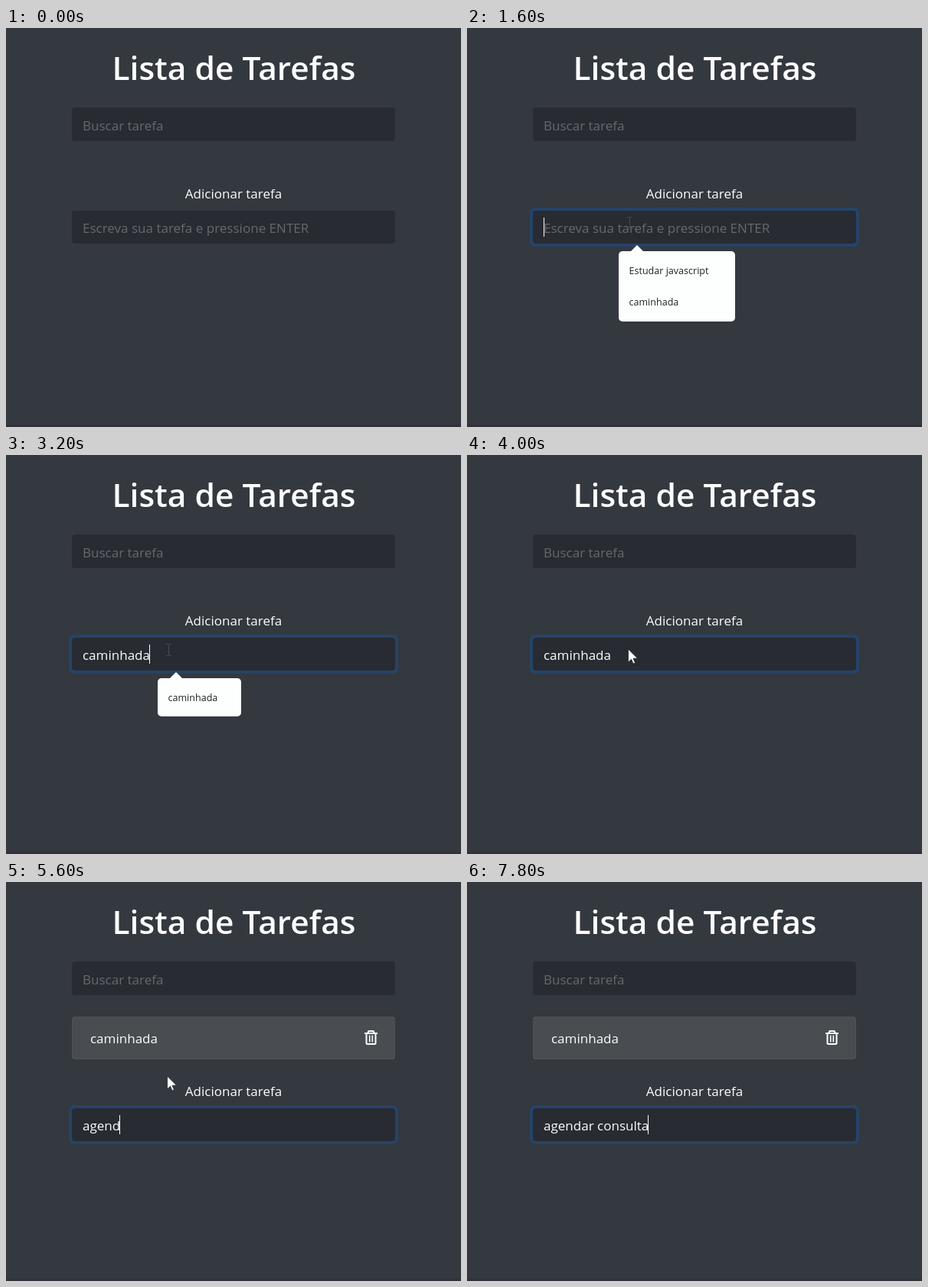
An HTML page with a canvas that plays this animation: 594x522 px, repeating every 8 s.

```html
<!DOCTYPE html>
<html lang="pt-BR">
<head>
<meta charset="utf-8">
<title>Lista de Tarefas</title>
<style>
  html, body { margin: 0; width: 100%; height: 100%; overflow: hidden; background: #34383f; }
  canvas { display: block; width: 594px; height: 522px; }
</style>
</head>
<body>
<canvas id="stage" width="594" height="522"></canvas>
<script>
const ctx = document.getElementById("stage").getContext("2d");
const LOOP = 8000, STEP = 200;
const FAMILY = '"Open Sans", "Noto Sans", sans-serif';
const BODY = "17.05px " + FAMILY;
const SMALL = "12.56px " + FAMILY;
const HEADING = "600 42.5px " + FAMILY;
const LEFT = 86, WIDTH = 422, ITEM_SHIFT = 57;

const COLORS = {
  page: "#34383f", edge: "#352f3b", field: "#282b32", ring: "#254468",
  item: "#494c50", hint: "#67696e", text: "#fcfdfd", ink: "#202224", beam: "#484b51"
};

function box(x, y, w, h, r, color) {
  ctx.fillStyle = color;
  ctx.beginPath();
  ctx.roundRect(x, y, w, h, r);
  ctx.fill();
}

function polygon(points, color) {
  ctx.fillStyle = color;
  ctx.beginPath();
  points.forEach(([x, y]) => ctx.lineTo(x, y));
  ctx.closePath();
  ctx.fill();
}

function label(text, x, y, font, color, align = "left") {
  ctx.font = font;
  ctx.fillStyle = color;
  ctx.textAlign = align;
  ctx.fillText(text, x, y);
}

// Text in the input box, one or more keys per screen update
function typedText(t) {
  const n = start => Math.floor((t - start) / STEP);
  if (t < 2400) return "";
  if (t < 4200) return "caminhada".slice(0, [1, 2, 4, 7][n(2400)] ?? 9);
  if (t < 5000) return "";
  const keys = n(5000) + (t >= 5600 ? 2 : 1);
  return "agendar consulta".slice(0, keys);
}

function caretVisible(t) {
  if (t < 1600) return false;
  if (t < 2400) return t < 2200;
  if (t < 4200) return t < 3600;
  return t >= 4600;
}

function inputField(t, shift) {
  const y = 239 + shift;
  const text = typedText(t);
  if (t >= 1600) box(LEFT - 4, y - 4, WIDTH + 8, 51, 7, COLORS.ring);
  box(LEFT, y, WIDTH, 43, 4, COLORS.field);
  if (text) label(text, 100, y + 29, BODY, COLORS.text);
  else label("Escreva sua tarefa e pressione ENTER", 100, y + 29, BODY, COLORS.hint);
  if (caretVisible(t)) {
    ctx.font = BODY;
    const x = Math.floor(100 + ctx.measureText(text).width - (text ? 0.6 : 0));
    box(x, y + 9, 1, 25, 0, COLORS.text);
  }
}

function suggestions(t) {
  if (t < 1600 || t >= 3600) return;
  const both = t < 2600;
  const rows = both ? ["Estudar javascript", "caminhada"] : ["caminhada"];
  polygon([[213, 293], [222, 284], [231, 293]], "#fdfefe");
  box(198, 292, both ? 152 : 109, both ? 92 : 50, 5, "#fdfefe");
  rows.forEach((row, i) => label(row, 211.5, 322 + 41 * i, SMALL, COLORS.ink));
}

function trash() {
  ctx.strokeStyle = COLORS.text;
  ctx.lineWidth = 2;
  ctx.lineJoin = "round";
  ctx.beginPath();
  ctx.moveTo(468, 198);
  ctx.lineTo(485, 198);
  ctx.moveTo(472, 198);
  ctx.lineTo(473.5, 195);
  ctx.lineTo(479.5, 195);
  ctx.lineTo(481, 198);
  ctx.moveTo(470.5, 198);
  ctx.lineTo(470.5, 210.5);
  ctx.quadraticCurveTo(470.5, 212, 472, 212);
  ctx.lineTo(481, 212);
  ctx.quadraticCurveTo(482.5, 212, 482.5, 210.5);
  ctx.lineTo(482.5, 198);
  ctx.stroke();
  ctx.lineWidth = 1.6;
  ctx.beginPath();
  for (const x of [474.7, 478.3]) {
    ctx.moveTo(x, 200.5);
    ctx.lineTo(x, 209.5);
  }
  ctx.stroke();
}

function taskItem() {
  box(LEFT, 176, WIDTH, 56, 4, "#505357");
  box(LEFT + 1, 177, WIDTH - 2, 54, 3, COLORS.item);
  label("caminhada", 110, 211, BODY, COLORS.text);
  trash();
}

function pointer(t) {
  if (t >= 1000 && t < 4000) {
    box(212, 248, 1, 14, 0, COLORS.beam);
    for (const y of [247, 262]) {
      box(209, y, 3, 1, 0, COLORS.beam);
      box(213, y, 3, 1, 0, COLORS.beam);
    }
  } else if (t >= 4000 && t < 6200) {
    const shape = [[0, 0], [0, 17], [4, 13.2], [6.5, 19], [9, 18], [6.5, 12.2], [12, 12]];
    const points = shape.map(([x, y]) => [210.5 + x, 254 + y]);
    polygon(points, COLORS.text);
    ctx.strokeStyle = "#24272c";
    ctx.lineWidth = 0.8;
    ctx.stroke();
  }
}

function draw(t) {
  const added = t >= 4200;
  const shift = added ? ITEM_SHIFT : 0;
  box(0, 0, 594, 522, 0, COLORS.page);
  box(0, 519, 594, 3, 0, COLORS.edge);
  label("Lista de Tarefas", 297.5, 68, HEADING, COLORS.text, "center");
  box(LEFT, 104, WIDTH, 44, 4, COLORS.field);
  label("Buscar tarefa", 100, 134, BODY, COLORS.hint);
  if (added) taskItem();
  label("Adicionar tarefa", 297, 223 + shift, BODY, COLORS.text, "center");
  inputField(t, shift);
  suggestions(t);
  pointer(t);
}

const start = performance.now();
function tick() {
  const t = (performance.now() - start) % LOOP;
  draw(Math.floor(t / STEP) * STEP);
  requestAnimationFrame(tick);
}
tick();
</script>
</body>
</html>
```
